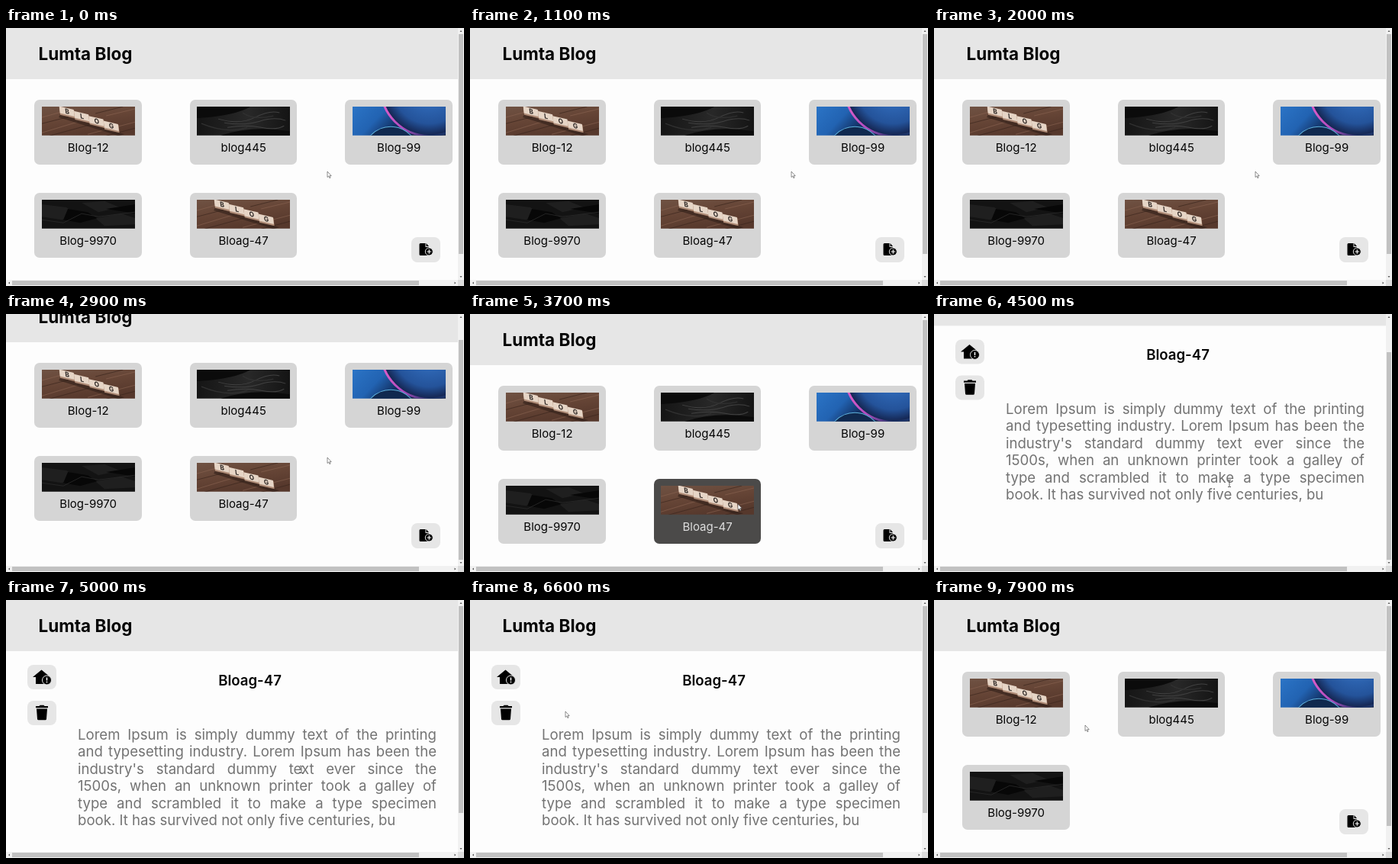
Animation, 600 px wide and 338 px high, one loop 8 s. Source, as an HTML page:

```html
<!DOCTYPE html>
<html lang="en">
<head>
<meta charset="utf-8">
<title>Blog</title>
<style>
html, body { margin: 0; width: 100%; height: 100%; overflow: hidden; background: #fdfdfd; }
body { position: relative; font-family: Inter, sans-serif; color: #050505; }
div, header, h1, h2, p, svg { position: absolute; margin: 0; white-space: nowrap; }
#view { width: 592px; height: 330px; overflow: hidden; }
#page { width: 592px; height: 390px; }
header { width: 592px; height: 67.4px; background: #e6e6e6; }
h1 { left: 42.5px; top: 20px; font-size: 22.5px; font-weight: 700; }
.card { width: 140.7px; height: 84.5px; border-radius: 7px; background: #d5d5d5; font-size: 15px; }
.card svg { left: 9.3px; top: 9.1px; width: 122.3px; height: 37.8px; }
.card p { top: 53.3px; width: 100%; text-align: center; }
.card.hover { background: #4b4a49; color: #dedede; }
.button { width: 38px; height: 32.5px; border-radius: 8px; background: #e6e6e6; }
.button svg { left: 0; top: 0; }
h2 { left: 94px; width: 451px; top: 94.3px; text-align: center; font-size: 18.6px; font-weight: 600; }
#text { left: 94px; top: 164.7px; width: 470px; font-size: 18.6px; line-height: 22.5px; color: #737373; }
#text p { position: static; text-align: justify; text-align-last: justify; white-space: normal; }
#text p:last-child { text-align-last: left; }
.bar { background: #f1f1f1; }
.thumb { background: #c1c1c1; }
</style>
</head>
<body>
<svg width="0" height="0">
  <defs>
    <linearGradient id="wood" x2=".4" y2="1">
      <stop stop-color="#6f5243"/><stop offset=".5" stop-color="#664536"/><stop offset="1" stop-color="#56382c"/>
    </linearGradient>
    <linearGradient id="sky" x2="1" y2=".3">
      <stop stop-color="#2b74c6"/><stop offset=".35" stop-color="#2263b2"/>
      <stop offset=".6" stop-color="#123062"/><stop offset="1" stop-color="#0c1a3c"/>
    </linearGradient>
    <radialGradient id="ball">
      <stop offset=".35" stop-color="#2f68b6"/><stop offset=".75" stop-color="#24539a"/><stop offset="1" stop-color="#13224c"/>
    </radialGradient>
    <linearGradient id="rim">
      <stop stop-color="#e25fc9"/><stop offset=".22" stop-color="#b04cc0"/><stop offset=".5" stop-color="#1d3468"/>
    </linearGradient>
    <linearGradient id="dune">
      <stop stop-color="#151515"/><stop offset=".55" stop-color="#282828"/><stop offset="1" stop-color="#141414"/>
    </linearGradient>
  </defs>
  <symbol id="tiles" viewBox="0 0 122 37.5" preserveAspectRatio="none">
    <path fill="url(#wood)" d="M0 0h122v38H0z"/>
    <path stroke="#8a6552" stroke-width="1" opacity=".6" fill="none" d="M0 14L40 3M0 34l46-14M60 36l62-16M84 12l38-9"/>
    <path stroke="#3c271e" stroke-width="1" opacity=".7" fill="none" d="M0 22l36-9M10 38l62-17M84 38l38-10M70 9l36-9"/>
    <path fill="#2f1f18" opacity=".6" d="M24 10l84 26-8 2-78-24z"/>
    <g id="letters" font-size="8.5" font-weight="700" text-anchor="middle"></g>
  </symbol>
  <symbol id="waves" viewBox="0 0 122 37.5" preserveAspectRatio="none">
    <path fill="url(#dune)" d="M0 0h122v38H0z"/>
    <path fill="#0b0b0b" d="M0 0h70Q50 12 0 15zM30 38q40-14 92-6v6z"/>
    <path fill="none" stroke="#414141" stroke-width="1" d="M28 16q28 8 48-2t32-6M36 21q26 4 46-2t34-1M40 27q24-4 44 0t30-2"/>
    <path fill="none" stroke="#303030" stroke-width="1.4" d="M6 22q34 14 60 5M60 8q14 10 40 4"/>
  </symbol>
  <symbol id="orbs" viewBox="0 0 122 37.5" preserveAspectRatio="none">
    <path fill="url(#sky)" d="M0 0h122v38H0z"/>
    <circle cx="100" cy="-25" r="63" fill="url(#ball)" stroke="url(#rim)" stroke-width="3"/>
    <circle cx="50" cy="62" r="36" fill="#10294f" stroke="#5fb2dc" stroke-width="1"/>
  </symbol>
  <symbol id="rocks" viewBox="0 0 122 37.5" preserveAspectRatio="none">
    <path fill="#131313" d="M0 0h122v38H0z"/>
    <path fill="#1f1f1f" d="M0 6l32 4 14 8-20 8-26-4zM52 4l30-2 20 8-28 6zM70 24l34-6 18 6v8l-40 2z"/>
    <path fill="#070707" d="M34 12l26 4 12 8-22 6-22-4zM84 12l38-6v12z"/>
    <path fill="none" stroke="#2b2b2b" stroke-width=".8" d="M0 26l28 4 24-12 22 4 48-6"/>
  </symbol>
</svg>

<div id="view">
  <div id="page">
    <header><h1>Lumta Blog</h1></header>
    <div id="list"></div>
    <div id="post">
      <div class="button" style="left:28px;top:84.7px">
        <svg width="38" height="33">
          <path d="M18.5 6.5L30 16h-3v9H11v-9H7z"/>
          <circle cx="25.5" cy="20" r="6" stroke="#e6e6e6"/>
          <path stroke="#fff" stroke-width="1.5" d="M25.5 16.5v4M25.5 21.7v1.5"/>
        </svg>
      </div>
      <div class="button" style="left:28px;top:131.7px">
        <svg width="38" height="33">
          <path d="M11 7h4.5l1-1.2h5l1 1.2H27v2.3H11zM12 10.5h14l-1 13.3q-.1 1.5-1.5 1.5h-9q-1.4 0-1.5-1.5z"/>
        </svg>
      </div>
      <h2>Bloag-47</h2>
      <div id="text">
        <p>Lorem Ipsum is simply dummy text of the printing</p>
        <p>and typesetting industry. Lorem Ipsum has been the</p>
        <p>industry's standard dummy text ever since the</p>
        <p>1500s, when an unknown printer took a galley of</p>
        <p>type and scrambled it to make a type specimen</p>
        <p>book. It has survived not only five centuries, bu</p>
      </div>
    </div>
  </div>
  <div id="add" class="button" style="left:531px;top:274px">
    <svg width="38" height="33">
      <path d="M12 8h6.5v5H23v11H12q-1.5 0-1.5-1.5v-13Q10.500 8 12 8zM19.500 8l3.500 4h-3.500z"/>
      <circle cx="23.3" cy="19" r="5" stroke="#e6e6e6"/>
      <path stroke="#fff" stroke-width="1.2" d="M20.500 19h5.600M23.300 16.200v5.600"/>
    </svg>
  </div>
</div>

<div class="bar" style="left:592px;top:0;width:8px;height:330px"></div>
<div class="bar" style="left:0;top:330px;width:592px;height:8px"></div>
<div style="left:592px;top:330px;width:8px;height:8px;background:#dcdcdc"></div>
<div class="thumb" id="thumb" style="left:593px;width:6px"></div>
<div class="thumb" style="left:8px;top:331px;width:533px;height:6px"></div>
<svg width="600" height="338" style="left:0;top:0">
  <path fill="#555" d="M594.500 5h3l-1.500-2zM594.500 325h3l-1.500 2zM5 332.500v3l-2-1.500zM587.500 332.500v3l2-1.500z"/>
  <g id="cursor">
    <path id="arrow" fill="#fff" stroke="#444" stroke-width=".6" d="M0 0v7.500l1.700-1.500 1.200 2.600 1.200-.5-1.200-2.500h2.300z"/>
    <path id="beam" fill="none" stroke="#333" stroke-width=".8" d="M-2-4.500h1.500l.5.500.5-.5H2M0-4v8M-2 4.500h1.500l.5-.5.5.5H2"/>
  </g>
</svg>

<script>
const $ = id => document.getElementById(id);
const LOOP = 8000, OPEN = 3900, BACK = 7000;

const cursorKeys = [
  [3400, 421, 188], [3700, 351, 249], [3900, 351, 249], [4200, 387, 222],
  [5100, 387, 222], [5800, 52, 146], [6500, 52, 146], [6600, 125, 146], [6900, 198, 164]
];
const scrollKeys = [
  [2500, 0], [2800, 30], [3100, 30], [3400, 0],
  [4300, 0], [4500, 51.6], [4700, 51.6], [5000, 0]
];

$("letters").innerHTML = [..."BLOG"].map((c, i) =>
  `<g transform="translate(${33 + i * 19.3} ${7 + i * 6.3}) rotate(13) skewX(20)">
    <path fill="#b08d78" d="M-10-4h20v9.5h-20z"/><path fill="#e6d5c6" d="M-10-5h19.5v8.500h-19.500z"/>
    <text y="2.3" fill="#2b2422">${c}</text></g>`).join("");

const posts = [["Blog-12", "tiles"], ["blog445", "waves"], ["Blog-99", "orbs"], ["Blog-9970", "rocks"], ["Bloag-47", "tiles"]];
$("list").innerHTML = posts.map(([name, art], i) =>
  `<div class="card" style="left:${37.3 + i % 3 * 203.5}px;top:${94 + (i > 2) * 122}px">
    <svg><use href="#${art}"/></svg><p>${name}</p></div>`).join("");
const lastCard = $("list").lastElementChild;

function tween(keys, t) {
  const i = keys.findIndex(k => k[0] > t);
  if (i < 0) return keys[keys.length - 1].slice(1);
  if (!i) return keys[0].slice(1);
  const a = keys[i - 1], b = keys[i], p = (t - a[0]) / (b[0] - a[0]);
  const ease = p * p * (3 - 2 * p);
  return a.slice(1).map((v, j) => v + (b[j + 1] - v) * ease);
}

const show = (el, on) => el.style.display = on ? "" : "none";

function draw(t) {
  const reading = t >= OPEN && t < BACK;
  const [x, y] = tween(cursorKeys, t), [scroll] = tween(scrollKeys, t);
  const ratio = 314 / (reading ? 382 : 360);

  show($("post"), reading);
  show($("list"), !reading);
  show($("add"), !reading);
  show(lastCard, t < BACK);
  lastCard.classList.toggle("hover", x > 241 && x < 381 && y > 216);

  $("page").style.transform = `translateY(${-scroll}px)`;
  $("thumb").style.top = 8 + scroll * ratio + "px";
  $("thumb").style.height = 330 * ratio + "px";

  const overText = reading && x > 94 && y > 165 - scroll;
  show($("beam"), overText);
  show($("arrow"), !overText);
  $("cursor").setAttribute("transform", `translate(${x} ${y})`);
}

const start = performance.now();
function frame() {
  draw((performance.now() - start) % LOOP);
  requestAnimationFrame(frame);
}
frame();
</script>
</body>
</html>
```
